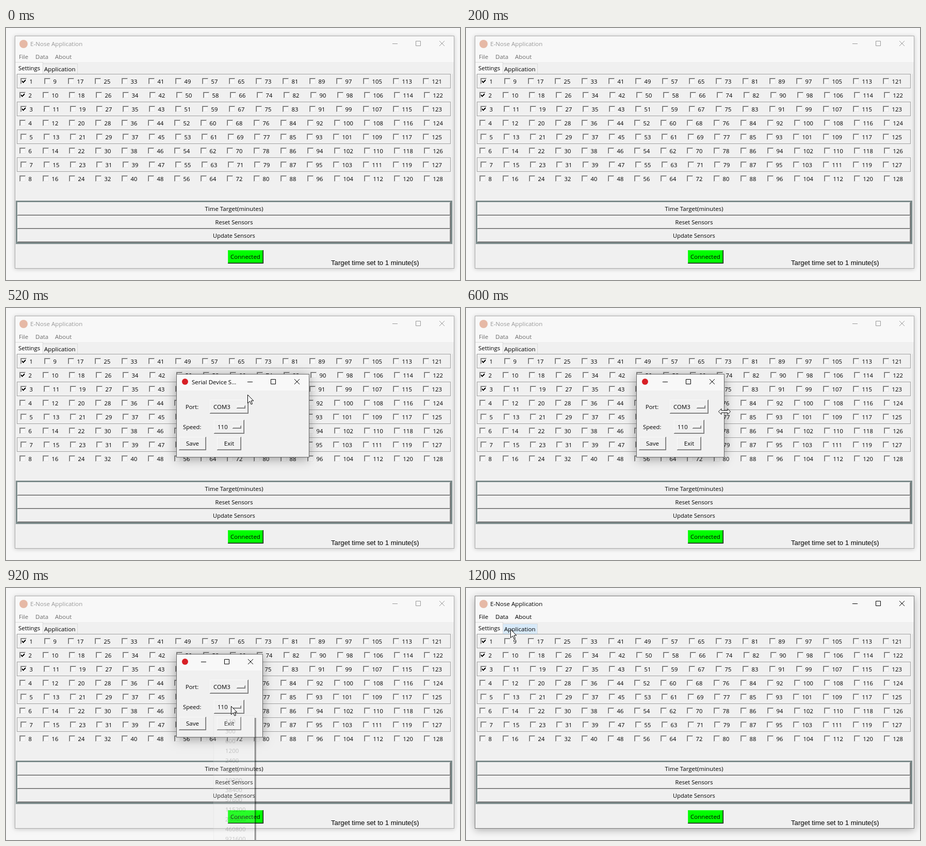
An HTML page with a canvas that plays this animation: 880 px wide and 489 px high, repeating every 1400 ms.

```html
<!DOCTYPE html>
<html lang="en">
<head>
<meta charset="utf-8">
<title>E-Nose Application</title>
<style>
html, body { margin: 0; width: 100%; height: 100%; overflow: hidden; background: #f7f7f7; }
canvas { display: block; }
</style>
</head>
<body>
<canvas id="stage" width="880" height="489"></canvas>
<script>
const ctx = document.getElementById('stage').getContext('2d');
const FACE = '#f0f0f0', PALE = '#f8f8f8', STEP = 200, STEPS = 7;

function box(x, y, w, h, color) {
  ctx.fillStyle = color;
  ctx.fillRect(x, y, w, h);
}

function outline(x, y, w, h, color) {
  ctx.strokeStyle = color;
  ctx.lineWidth = 1;
  ctx.strokeRect(x + .5, y + .5, w - 1, h - 1);
}

function text(str, x, y, { size = 11.5, color = '#000', align = 'left', font = '"Open Sans", sans-serif' } = {}) {
  ctx.font = `${size}px ${font}`;
  ctx.fillStyle = color;
  ctx.textAlign = align;
  ctx.fillText(str, x, y);
}

function dot(x, y, r, color) {
  ctx.fillStyle = color;
  ctx.beginPath();
  ctx.arc(x, y, r, 0, 7);
  ctx.fill();
}

function shape(points, x, y, fill) {
  ctx.beginPath();
  points.forEach(([px, py]) => ctx.lineTo(x + px, y + py));
  ctx.closePath();
  ctx.fillStyle = fill;
  ctx.fill();
  ctx.strokeStyle = '#000';
  ctx.lineWidth = 1;
  ctx.stroke();
}

function shadowed(x, y, w, h, color, blur, alpha, drop) {
  ctx.save();
  ctx.shadowColor = `rgba(0,0,0,${alpha})`;
  ctx.shadowBlur = blur;
  ctx.shadowOffsetY = drop;
  box(x, y, w, h, color);
  ctx.restore();
}

// Raised widget: light top and left, dark bottom and right
function raised(x, y, w, h, fill = FACE, light = PALE, mid = '#a0a0a0', dark = '#696969') {
  box(x, y, w, h, dark);
  box(x, y, w - 1, h - 1, light);
  box(x + 1, y + 1, w - 2, h - 2, mid);
  box(x + 1, y + 1, w - 3, h - 3, fill);
}

function button(label, x, y, w, h, size) {
  raised(x, y, w, h);
  text(label, x + w / 2, Math.round(y + h / 2 + 4), { align: 'center', size });
}

function optionMenu(label, x, y, w) {
  raised(x, y, w, 27);
  text(label, x + 7, y + 18);
  raised(x + w - 23, y + 11, 17, 6);
}

function windowButtons(right, y, color) {
  ctx.strokeStyle = color;
  ctx.lineWidth = 1;
  ctx.beginPath();
  ctx.moveTo(right - 119, y + .5);
  ctx.lineTo(right - 109, y + .5);
  ctx.rect(right - 73.5, y - 4.5, 9, 9);
  ctx.moveTo(right - 28, y - 5);
  ctx.lineTo(right - 18, y + 5);
  ctx.moveTo(right - 18, y - 5);
  ctx.lineTo(right - 28, y + 5);
  ctx.stroke();
}

function checkbox(x, y, checked) {
  box(x, y, 13, 13, PALE);
  box(x, y, 12, 12, '#a0a0a0');
  box(x + 1, y + 1, 11, 11, '#e3e3e3');
  box(x + 1, y + 1, 10, 10, '#696969');
  box(x + 2, y + 2, 9, 9, PALE);
  if (checked)
    for (let i = 0; i < 7; i++) box(x + 3 + i, y + 5 + (i < 3 ? i : 4 - i), 1, 3, '#000');
}

function sensorX(row, col) {
  const start = row % 2 ? 26 : 28;
  if (!col) return start;
  if (!row && col === 1) return 74;
  const narrow = [0, 1, 5, 7, 11, 7, 11, 7][row];
  const wide = Math.max(0, col - (row < 3 ? 13 : 12));
  return start + (row ? 45 : 40) + 52 * (col - 1) - Math.min(col - 1, narrow) + 6 * wide;
}

function sensors() {
  for (let row = 0; row < 8; row++) {
    const y = 97 + 27 * row;
    if (row % 2 === 0) outline(21, y - 8, 841, 28, '#a0a0a0');
    for (let col = 0; col < 16; col++) {
      const x = sensorX(row, col), n = col * 8 + row + 1;
      checkbox(x, y, n < 4);
      text(n, x + 17.5, y + 11, { size: 11.3 });
    }
  }
}

function mainWindow(active) {
  shadowed(17, 15, 852, 452, PALE, active ? 14 : 8, active ? .3 : .2, active ? 3 : 1);
  box(17, 66, 852, 401, FACE);
  outline(17, 15, 852, 452, active ? '#777' : '#aaa');

  dot(34, 31, 8, '#e6b9a6');
  text('E-Nose Application', 47, 35, { color: active ? '#000' : '#999', size: 11.6 });
  windowButtons(868, 30, active ? '#000' : '#999');
  const menu = { color: active ? '#000' : '#6d6d6d' };
  text('File', 25, 60, menu);
  text('Data', 57, 60, menu);
  text('About', 95, 60, menu);

  box(18, 89, 848, 331, '#dcdcdc');
  box(18, 89, 847, 330, FACE);
  box(71, 69, 68, 20, '#d9d9d9');
  box(72, 70, 66, 19, active ? '#d8eaf9' : FACE);
  box(18, 66, 54, 24, '#d9d9d9');
  box(18, 67, 53, 23, PALE);
  text('Settings', 24, 82, { size: 11.4 });
  text('Application', 74, 84, { size: 11.6 });
  sensors();

  box(19, 335, 846, 84, '#7b8a8a');
  button('Time Target(minutes)', 22, 338, 840, 26);
  button('Reset Sensors', 22, 364, 840, 26, 11.2);
  button('Update Sensors', 22, 390, 840, 26, 11.1);

  raised(430, 431, 69, 26, '#0f0', '#3f3', '#090', '#000');
  text('Connected', 464, 448, { align: 'center' });
  text('Target time set to 1 minute(s)', 630, 460, { size: 13.2, font: '"Liberation Sans", Arial, sans-serif' });
}

function dialog(right, speed, saved) {
  const w = right - 330;
  shadowed(330, 128, w, 162, PALE, 20, .38, 3);
  box(330, 160, w, 130, FACE);
  outline(330, 128, w + 1, 162, '#666');
  dot(347, 143, 6, '#d81f26');
  if (right > 550) text('Serial Device S...', 360, 148);
  windowButtons(right, 143, '#000');

  const shift = saved ? 1 : 0;
  text('Port:', 348, 196, { size: 11.3 });
  optionMenu('COM3', 395 + shift, 178, 75);
  text('Speed:', 343, 235, { size: 11.2 });
  if (saved) optionMenu(speed, 395, 217, 77);
  else optionMenu(speed, 403, 217, 59);
  button('Save', 335, 250, 53, 26);
  button('Exit', 409 + shift, 250, 47, 26);
}

// Speed list, still nearly transparent
function speedList() {
  ctx.save();
  ctx.globalAlpha = .16;
  box(402, 247, 80, 242, FACE);
  outline(402, 247, 80, 260, '#bbb');
  ctx.globalAlpha = .2;
  [110, 300, 600, 1200, 2400, 9600, 19200, 38400, 57600, 115200, 230400, 460800, 921600]
    .forEach((rate, i) => text(rate, 425, 263 + 19 * i));
  ctx.restore();
  const fade = ctx.createLinearGradient(482, 0, 486, 0);
  fade.addColorStop(0, 'rgba(0,0,0,.6)');
  fade.addColorStop(1, 'rgba(0,0,0,0)');
  box(482, 252, 4, 237, fade);
}

function pointer(x, y) {
  shape([[0, 0], [0, 16], [4, 12.5], [6.7, 18.5], [9, 17.5], [6.5, 11.5], [11.3, 11.5]], x + .5, y + .5, '#fff');
}

function resizer(x, y) {
  const half = [[-11.5, 0], [-6, -5.5], [-6, -2], [6, -2], [6, -5.5]];
  shape([...half, ...half.map(([px, py]) => [-px, -py])], x, y, '#fff');
}

function draw(step) {
  box(0, 0, 880, 489, '#f7f7f7');
  mainWindow(step === 6);
  if (step === 2) {
    dialog(587, '110');
    pointer(468, 168);
  } else if (step === 3) {
    dialog(500, '110');
    resizer(501, 201);
  } else if (step === 4) {
    dialog(497, '110');
    speedList();
    pointer(436, 229);
  } else if (step === 5) {
    dialog(497, '115200', true);
    pointer(354, 261);
  } else if (step === 6) {
    pointer(86, 80);
  }
}

function tick() {
  draw(Math.floor(performance.now() / STEP) % STEPS);
  requestAnimationFrame(tick);
}
tick();
</script>
</body>
</html>
```
